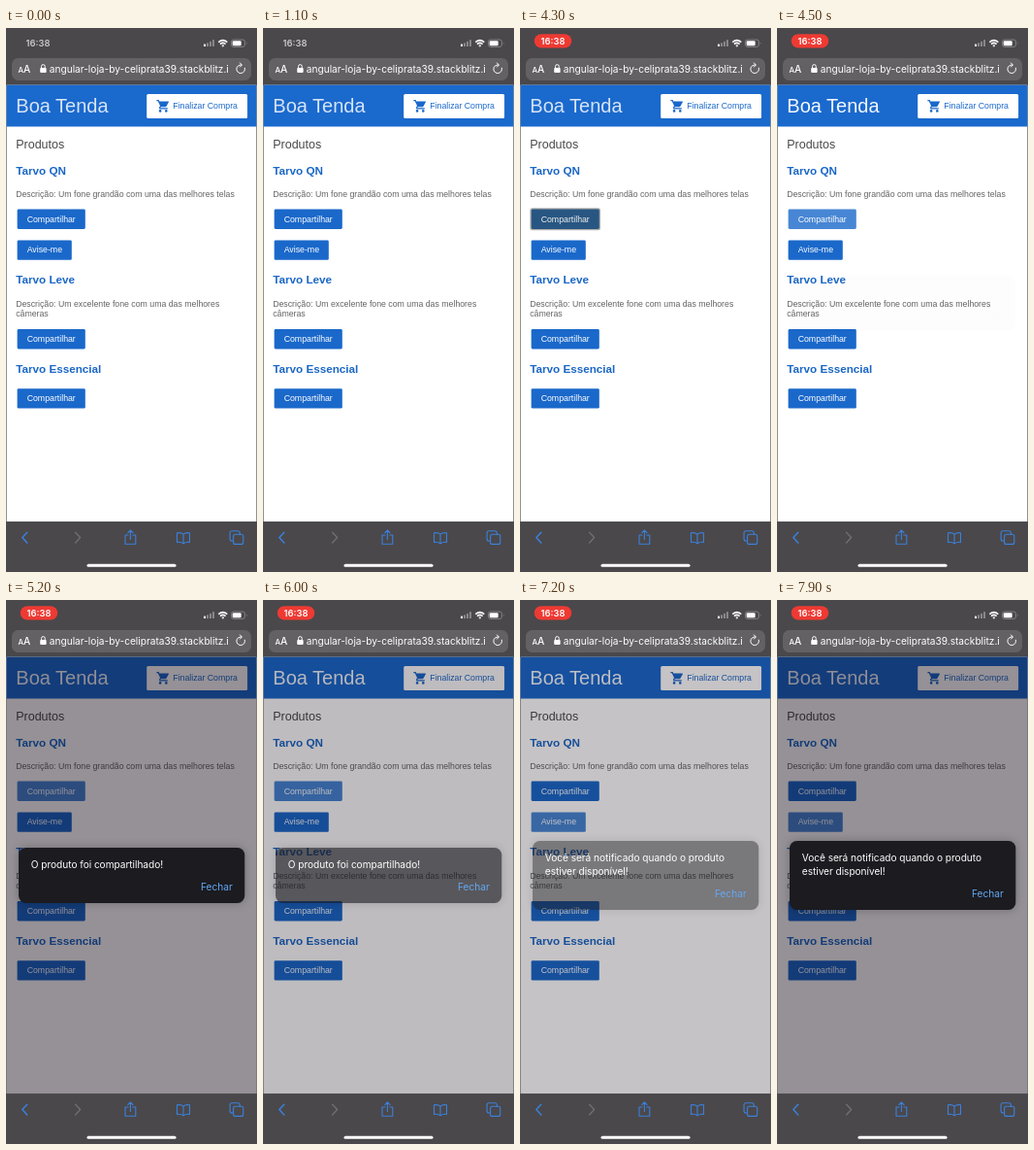
An HTML page that plays this animation: 259 by 560 pixels, repeating every 8000 ms.

```html
<!DOCTYPE html>
<html lang="pt">
<head>
<meta charset="utf-8">
<style>
html, body { margin: 0; width: 100%; height: 100%; overflow: hidden; background: #4a484b; }
svg { display: block; width: 100vw; height: 100vh; }
text { font-family: "Liberation Sans", Arial, sans-serif; font-size: 8.76px; }
.ui { font-family: Inter, Roboto, sans-serif; font-size: 10.15px; }
.clock { font-size: 9.4px; font-weight: 600; }
.h1 { font-size: 20px; fill: #d6e4f6; }
.h2 { font-size: 12.5px; fill: #484848; }
.h3 { font-size: 11.7px; font-weight: bold; fill: #1b67c6; }
.p { fill: #636363; }
.blue { fill: #1a68ca; }
.white { fill: #fff; }
.panel { fill: #1b1b20; filter: drop-shadow(0 0 5px rgba(0, 0, 0, .25)); }
.msg { letter-spacing: -.04px; }
.line { fill: none; stroke: #3b80dc; stroke-width: 1.1; stroke-linecap: round; stroke-linejoin: round; }
.off { stroke: #6f6e70; }
</style>
</head>
<body>
<svg viewBox="0 0 259 560">
  <rect width="259" height="560" fill="#4a484b"/>

  <!-- status bar -->
  <text id="idle" class="ui clock" x="20.5" y="19" fill="#c9c8ca">16:38</text>
  <g id="pill">
    <rect x="14.8" y="6.2" width="38.4" height="14.4" rx="7.2" fill="#ee3a33"/>
    <g id="rec">
      <circle cx="33.9" cy="13.4" r="4.7" fill="none" stroke="#fff" stroke-width="1"/>
      <circle cx="33.9" cy="13.4" r="2.8" class="white"/>
    </g>
    <text id="live" class="ui clock white" x="21.5" y="16.8">16:38</text>
  </g>
  <g class="white">
    <rect x="204" y="16.5" width="2" height="2.5" rx=".5"/>
    <rect x="207" y="15.3" width="2" height="3.7" rx=".5" opacity=".35"/>
    <rect x="210" y="13.8" width="2" height="5.2" rx=".5" opacity=".35"/>
    <rect x="213" y="12" width="2" height="7" rx=".5" opacity=".35"/>
  </g>
  <g fill="none" stroke="#fff" stroke-width="1.5">
    <path d="M219.3 14.6q4.5-4 9 0M221 16.6q2.8-2.4 5.6 0"/>
    <circle cx="223.8" cy="18.3" r=".4"/>
  </g>
  <rect x="232.5" y="12" width="14" height="7.4" rx="2.2" fill="none" stroke="#8f8e90" stroke-width=".8"/>
  <rect x="233.7" y="13.2" width="9" height="5" rx="1.2" class="white"/>
  <path d="M248 14.5q1.2 1.2 0 2.4z" fill="#8f8e90"/>

  <!-- address bar -->
  <rect x="6" y="31" width="247" height="23" rx="6.5" fill="#636164"/>
  <text class="ui white" x="12.5" y="45.5" font-weight="500"><tspan style="font-size:7.8px">A</tspan><tspan style="font-size:10.2px">A</tspan></text>
  <rect x="35.2" y="41" width="6.4" height="5" rx="1" class="white"/>
  <path d="M36.6 41v-1.6a1.8 1.8 0 0 1 3.6 0V41" fill="none" stroke="#fff"/>
  <text class="ui white" x="44.8" y="45.6">angular-loja-by-celiprata39.stackblitz.i</text>
  <g fill="none" stroke="#fff" stroke-width="1" stroke-linecap="round">
    <path d="M246.4 41.2a4.3 4.3 0 1 1-3.5-3.2"/>
    <path d="M241.4 35.9l2 2.1-2 2.1"/>
  </g>

  <!-- page -->
  <rect x=".6" y="58.7" width="257.8" height="449.5" class="white"/>
  <rect x=".6" y="58.7" width="257.8" height="42.8" fill="#1a69cd"/>
  <text id="brand" class="h1" x="10.3" y="87">Boa Tenda</text>
  <rect x="145.2" y="67.9" width="103.9" height="25.2" rx="1.5" class="white"/>
  <g class="blue">
    <path d="M155.4 74h2.2l.7 1.4h9.1q.9 0 .5.9l-2.3 4.2q-.4.7-1.1.7h-4.7l-.6 1.1h7.6v1.3h-7.7q-1.8-.2-1-1.9l.9-1.6-2.3-4.8h-1.3z"/>
    <circle cx="159.1" cy="85.4" r="1.3"/>
    <circle cx="165.3" cy="85.4" r="1.3"/>
    <text x="172.3" y="83.3">Finalizar Compra</text>
  </g>
  <text class="h2" x="10.2" y="123.7">Produtos</text>
  <text class="h3" x="10.2" y="150.6">Tarvo QN</text>
  <text class="p" x="10.2" y="174">Descrição: Um fone grandão com uma das melhores telas</text>
  <text class="h3" x="10.2" y="263.4">Tarvo Leve</text>
  <text class="p" x="10.2" y="286.9">Descrição: Um excelente fone com uma das melhores</text>
  <text class="p" x="10.2" y="297">câmeras</text>
  <text class="h3" x="10.2" y="354.6">Tarvo Essencial</text>
  <g id="buttons"></g>
  <rect id="dim" x=".6" y="58.7" width="257.8" height="449.5" fill="#0a000c"/>
  <g id="dialogs"></g>

  <!-- toolbar -->
  <rect y="508.2" width="259" height="51.8" fill="#4a484b"/>
  <g class="line">
    <path d="M21.8 519.3l-5 5.3 5 5.3" stroke-width="1.5"/>
    <path class="off" d="M71.6 519.3l5 5.3-5 5.3" stroke-width="1.4"/>
    <path d="M126 522h-3v9.3h10.8V522h-3M128.4 526.5v-9.3M125.8 519.6l2.6-2.6 2.6 2.6"/>
    <path d="M183 521.2q-2.4-2.2-6.5-1.4v9.6q4.1-.6 6.5 1.4 2.4-2 6.5-1.4v-9.6q-4.1-.8-6.5 1.4v9.6"/>
    <rect x="234.6" y="521.2" width="10.2" height="10.2" rx="2"/>
    <path d="M234.6 528h-1.5q-2 0-2-2v-6.2q0-2 2-2h6.2q2 0 2 2v1.4"/>
  </g>
  <rect x="83.5" y="551.8" width="92" height="3" rx="1.5" class="white"/>
</svg>
<script>
const LOOP = 8000;
const $ = id => document.getElementById(id);

const button = (id, y, w, label) => `
  <rect id="${id}Ring" x="10.3" y="${y - 1.3}" width="${w + 2.6}" height="23" rx="2.5" fill="#b3b1ac"/>
  <g id="${id}">
    <rect id="${id}Face" x="11.6" y="${y}" width="${w}" height="20.4" rx="1.4" fill="#1a68ca"/>
    <text class="white" x="21.7" y="${y + 13}">${label}</text>
  </g>`;

$("buttons").innerHTML =
  button("share", 186.6, 70.2, "Compartilhar") +
  button("notify", 218.4, 56.2, "Avise-me") +
  button("share2", 310.1, 70.2, "Compartilhar") +
  button("share3", 371.2, 70.2, "Compartilhar");

const dialog = (id, y, h, lines) => `
  <g id="${id}Panel">
    <rect class="panel" x="13" y="${y}" width="233.3" height="${h}" rx="7.5"/>
  </g>
  <g id="${id}Text">
    ${lines.map((s, i) => `<text class="ui msg white" x="25.8" y="${y + 20.6 + 14 * i}">${s}</text>`).join("")}
    <text class="ui" x="201" y="${y + h - 13}" fill="#64a8f2">Fechar</text>
  </g>`;

$("dialogs").innerHTML =
  dialog("shared", 255, 57, ["O produto foi compartilhado!"]) +
  dialog("notice", 248, 71, ["Você será notificado quando o produto", "estiver disponível!"]);

// Opacity steps as [ms, value]; equal times make a hard change.
const tracks = {
  idle: [[1300, 1], [1500, 0]],
  pill: [[1300, 0], [1500, 1]],
  rec: [[3700, 1], [3900, 0]],
  live: [[3700, 0], [3900, 1]],
  shareRing: [[4200, 0], [4200, 1], [4450, 1], [4450, 0]],
  share: [[4200, 1], [4200, .8], [6600, .8], [6600, 1]],
  notifyRing: [[6600, 0], [6600, 1], [6850, 1], [6850, 0]],
  notify: [[6600, 1], [6600, .8]],
  share2Ring: [[0, 0]],
  share3Ring: [[0, 0]],
  dim: [[4500, 0], [4850, .43], [5880, .43], [6190, 0], [7000, 0], [7370, .43]],
  sharedPanel: [[4500, 0], [4850, 1], [5880, 1], [6180, .07], [6300, 0]],
  sharedText: [[4500, 0], [4650, 1], [6130, 1], [6300, 0]],
  noticePanel: [[7050, 0], [7390, 1]],
  noticeText: [[7000, 0], [7150, 1]]
};

function valueAt(steps, t) {
  const next = steps.findIndex(s => s[0] > t);
  if (next === 0) return steps[0][1];
  if (next < 0) return steps[steps.length - 1][1];
  const [t0, a] = steps[next - 1], [t1, b] = steps[next];
  return a + (b - a) * (t - t0) / (t1 - t0);
}

const parts = Object.entries(tracks).map(([id, steps]) => [$(id), steps]);
const start = performance.now();

function draw() {
  const t = (performance.now() - start) % LOOP;
  for (const [el, steps] of parts) el.style.opacity = valueAt(steps, t);
  const faceColor = (from, to) => t >= from && t < to ? "#064078" : "#1a68ca";
  $("shareFace").style.fill = faceColor(4200, 4450);
  $("notifyFace").style.fill = faceColor(6600, 6850);
  $("brand").style.fill = t < 4500 ? "#d6e4f6" : "#f4f8fd";
  requestAnimationFrame(draw);
}
draw();
</script>
</body>
</html>
```
